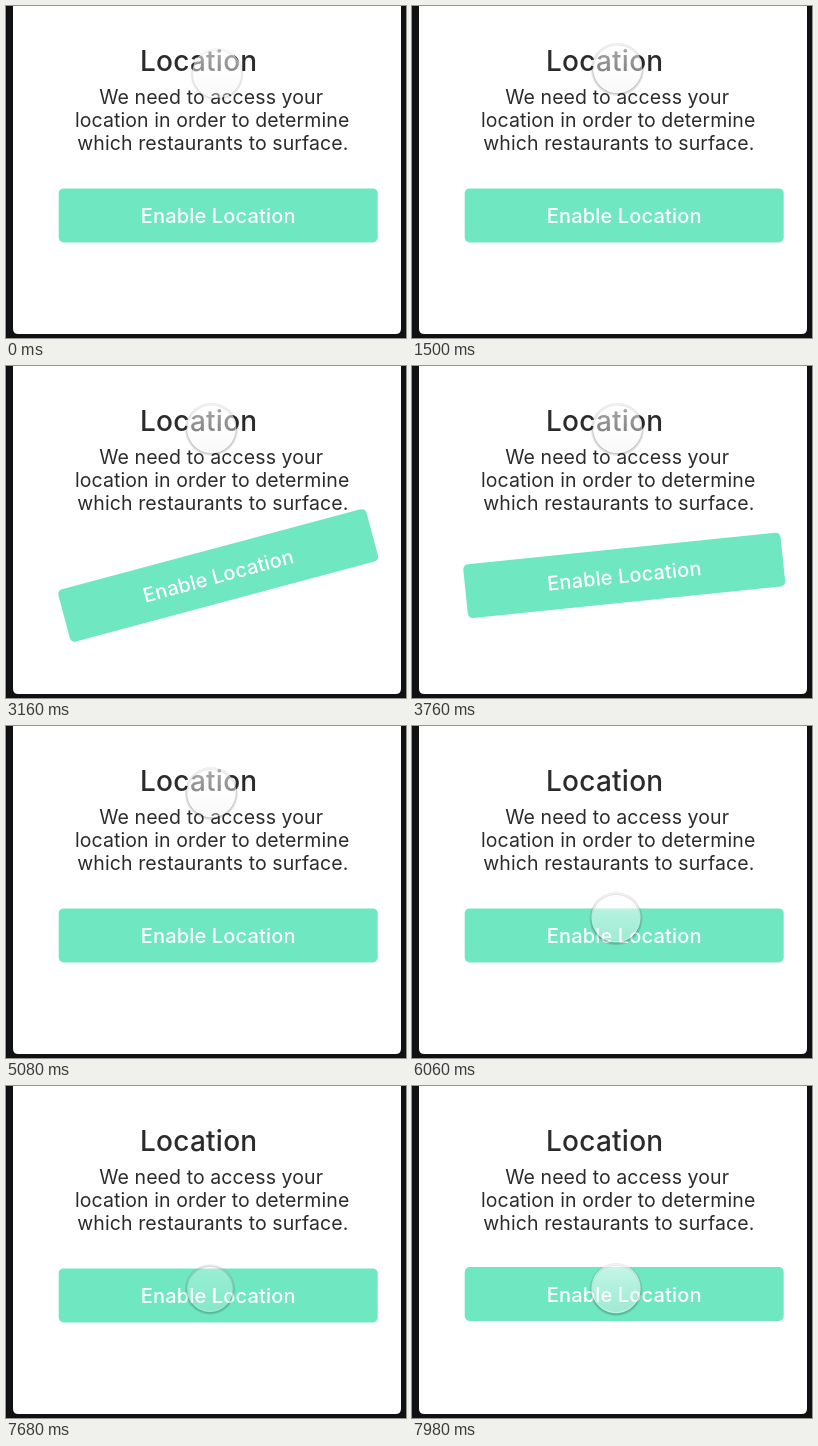
Recreate the animation shown at these times as an HTML page. Size 400x332 px, loop 8 s.

```html
<!DOCTYPE html>
<html lang="en">
<head>
<meta charset="utf-8">
<title>Location permission</title>
<style>
  html, body { margin: 0; width: 100%; height: 100%; overflow: hidden; background: #101113; }
  svg { display: block; width: 100vw; height: 100vh; }
  text { font-family: Inter, Roboto, sans-serif; fill: #2b2b2b; }
  .title { font-size: 28px; font-weight: 500; letter-spacing: .25px; }
  .body text { font-size: 19.5px; letter-spacing: .09px; }
  .label { font-size: 20px; font-weight: 500; letter-spacing: .17px; fill: #fff; text-anchor: middle; }
</style>
</head>
<body>
<svg viewBox="0 0 400 332">
  <defs>
    <linearGradient id="glass" x1="0" y1="0" x2="0" y2="1">
      <stop offset="0" stop-color="#fff" stop-opacity=".62"/>
      <stop offset=".55" stop-color="#fcfcfc" stop-opacity=".44"/>
      <stop offset="1" stop-color="#eee" stop-opacity=".38"/>
    </linearGradient>
    <radialGradient id="shade">
      <stop offset=".86" stop-color="#000" stop-opacity="0"/>
      <stop offset=".9" stop-color="#000" stop-opacity=".25"/>
      <stop offset="1" stop-color="#000" stop-opacity="0"/>
    </radialGradient>
  </defs>
  <rect width="400" height="332" fill="#101113"/>
  <path d="M7 0H395V322.5Q395 328 389.500 328H12.500Q7 328 7 322.500Z" fill="#fff"/>
  <text class="title" x="134" y="64.500">Location</text>
  <g class="body">
    <text x="93.200" y="97.500">We need to access your</text>
    <text x="69" y="121">location in order to determine</text>
    <text x="71.300" y="144">which restaurants to surface.</text>
  </g>
  <g id="button">
    <rect x="-159.500" y="-27" width="319" height="54" rx="5" fill="#6fe7c1"/>
    <text class="label" x="0" y="7.500">Enable Location</text>
  </g>
  <g id="touch">
    <circle id="shadow" cy="1.300" r="27" fill="url(#shade)"/>
    <circle id="disc" r="24.300" fill="url(#glass)" stroke="#fff" stroke-opacity=".5"/>
  </g>
</svg>
<script>
const LOOP = 8000;
const SWING = { start: 2645, step: 259, angles: [0, 15, -15, 7.5, -7.5, 0] };
const BOUNCE_START = 7945;

// Touch pointer stops: time, x, y, shadow strength, press depth
const STOPS = [
  [0, 211, 67, .55, 0],
  [420, 205.5, 62, .9, 0],
  [5000, 205.5, 62, .9, 0],
  [5700, 204, 191.5, 1, 0],
  [6080, 204, 191.5, 1, 0],
  [6460, 204, 202.3, .9, 0],
  [7150, 204, 202.3, .9, 0],
  [7300, 204, 202.3, .9, 1],
  [7800, 204, 202.3, .9, 1],
  [7950, 204, 202.3, .9, 0],
  [LOOP, 204, 202.3, .9, 0],
];

const button = document.getElementById('button');
const touch = document.getElementById('touch');
const shadow = document.getElementById('shadow');
const disc = document.getElementById('disc');

const lerp = (a, b, p) => a + (b - a) * p;
const ease = p => (1 - Math.cos(Math.PI * p)) / 2;

function swingAngle(t) {
  const { start, step, angles } = SWING;
  const pos = (t - start) / step;
  const i = Math.floor(pos);
  if (i < 0 || i >= angles.length - 1) return 0;
  return lerp(angles[i], angles[i + 1], ease(pos - i));
}

function touchState(t) {
  const i = STOPS.findIndex(stop => stop[0] > t);
  const from = STOPS[i - 1], to = STOPS[i];
  const p = ease((t - from[0]) / (to[0] - from[0]));
  return from.map((value, k) => lerp(value, to[k], p));
}

function draw(t) {
  const lift = 1.3 * (Math.max(0, t - BOUNCE_START) / 35) ** 2;
  button.setAttribute('transform', `translate(212.2 ${209.4 - lift}) rotate(${swingAngle(t)})`);
  const [, x, y, strength, press] = touchState(t);
  touch.setAttribute('transform', `translate(${x} ${y}) scale(${1 - .05 * press})`);
  shadow.setAttribute('opacity', strength);
  disc.setAttribute('opacity', 1 - .5 * press);
}

const begin = performance.now();
function frame() {
  draw((performance.now() - begin) % LOOP);
  requestAnimationFrame(frame);
}
frame();
</script>
</body>
</html>
```
